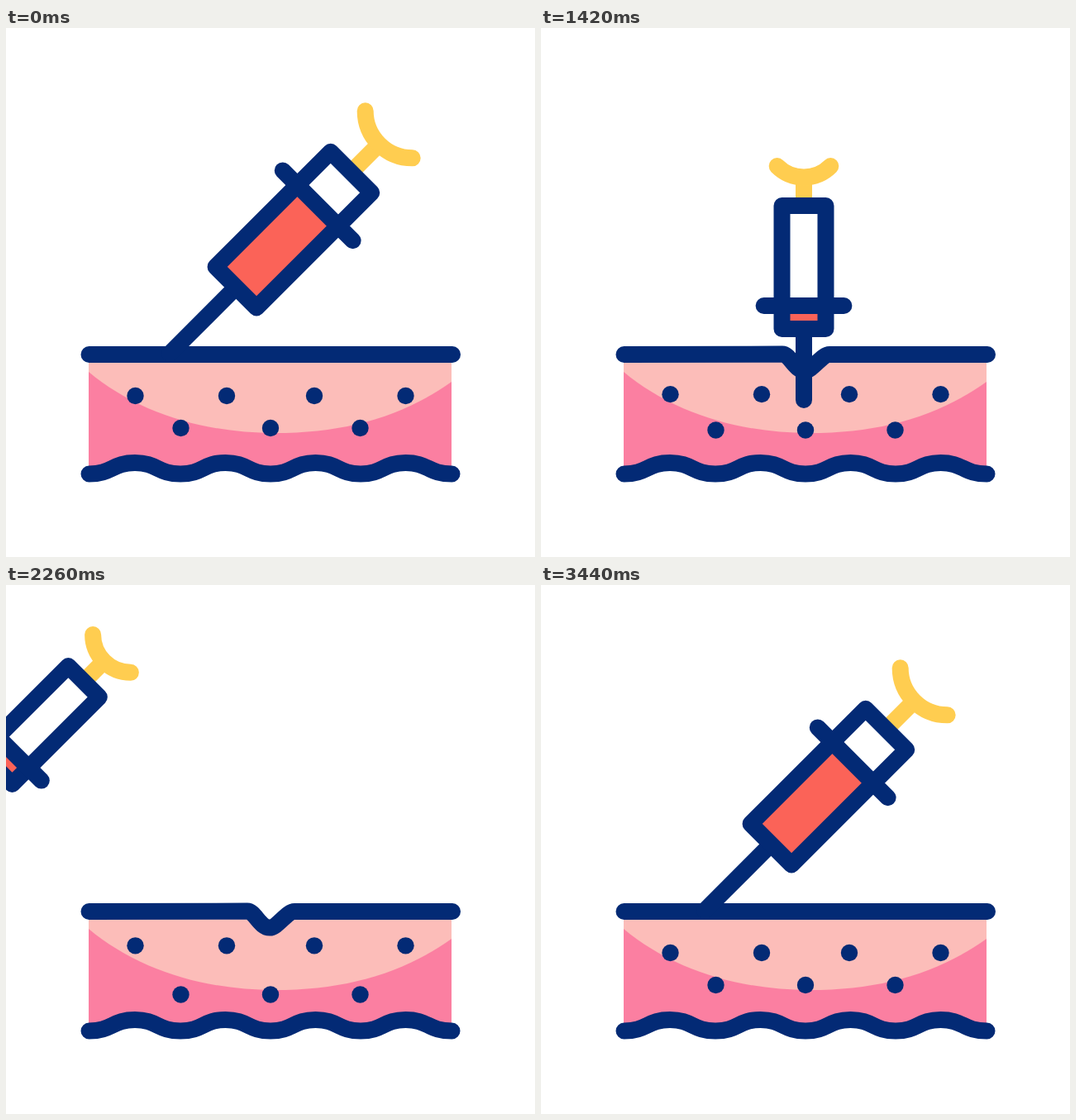
Write an HTML page that moves like this. It is 640 px wide and 640 px high and loops after 3.6 s.

```html
<!DOCTYPE html>
<html lang="en">
<head>
<meta charset="utf-8">
<title>Injection</title>
<style>
  html, body { margin: 0; width: 100%; height: 100%; overflow: hidden; background: #fff; }
  svg { display: block; width: 640px; height: 640px; }

  .line { fill: none; stroke: #032a75; stroke-width: 20; stroke-linecap: round; stroke-linejoin: round; }
  .thin * { vector-effect: non-scaling-stroke; }
  .white { fill: #fff; }
  .yellow { stroke: #ffcd50; }
  .butt { stroke-linecap: butt; }
  .dots { fill: #032a75; }

  .syringe, .grip, .bar, .fluid, .dots, .surface {
    animation: 3600ms cubic-bezier(.37, 0, .63, 1) infinite;
  }
  .syringe { animation-name: travel, tilt, size; }
  .grip { animation-name: grip; }
  .bar { animation-name: bar; }
  .fluid { animation-name: drain; }
  .surface { animation-name: dent; }
  .dots { animation-name: drift; }
  .upper { --shift: -9px; }
  .lower { --shift: 12px; }

  /* Position of the needle tip */
  @keyframes travel {
    0%, 6.667% { translate: 198px 394px; }
    17.778% { translate: 318px 336px; }
    27.778%, 40% { translate: 318px 450px; }
    50% { translate: 318px 337px; animation-timing-function: cubic-bezier(.33, 0, .67, .33); }
    55% { translate: 221px 330px; animation-timing-function: linear; }
    62.778% { translate: -71px 283px; animation-timing-function: linear; }
    67.222% { translate: -240px 282px; }
    67.23%, 76.667% { translate: 711px 366px; }
    95.556%, 100% { translate: 198px 394px; }
  }
  @keyframes tilt {
    0%, 6.667% { rotate: 45deg; }
    17.778%, 49.6% { rotate: 0deg; }
    62.778%, 100% { rotate: 45deg; }
  }
  @keyframes size {
    0%, 6.667% { scale: 1; }
    17.778%, 67.222% { scale: .757; }
    67.23%, 100% { scale: 1; }
  }

  /* Plunger handle, stopper and fluid */
  @keyframes grip {
    0%, 6.667% { translate: 0 0; scale: 1; }
    17.778%, 27.778% { translate: 0 -31.7px; scale: .985; }
    38.333%, 67.222% { translate: 0 1.3px; scale: 1.06; }
    67.23%, 100% { translate: 0 0; scale: 1; }
  }
  @keyframes bar {
    0%, 6.667% { translate: 0 0; scale: 1; }
    17.778%, 27.778% { translate: 0 0; scale: .99; }
    38.333%, 67.222% { translate: 0 102.8px; scale: 1.065; }
    67.23%, 100% { translate: 0 0; scale: 1; }
  }
  @keyframes drain {
    0%, 27.778% { scale: 1 1; }
    38.333%, 67.222% { scale: 1 .265; }
    67.23%, 100% { scale: 1 1; }
  }

  /* Skin */
  @keyframes dent {
    0%, 21.111%, 77.778%, 100% {
      d: path("M100.5 395L310 395C314 395 316 395 319 395C322 395 325 395 328 395L540 395");
    }
    26.111%, 68.333% {
      d: path("M100.5 395L292 394.6C301 394.6 307 414.6 319 414.6C328 414.6 340 395 349 395L540 395");
    }
  }
  @keyframes drift {
    0%, 17.222% { translate: 0 0; }
    30.556% { translate: 0 var(--shift); }
    43.333% { translate: 0 0; }
    65.556% { translate: 0 var(--shift); }
    81.667%, 100% { translate: 0 0; }
  }
</style>
</head>
<body>
<svg viewBox="0 0 640 640">
  <rect x="100" y="395" width="439" height="137" fill="#fb7fa1"/>
  <path d="M100 395V416C160 466 240 490 325 490C410 490 480 470 539 428V395Z" fill="#fcbdb9"/>
  <path class="line" d="M100.5 539.5c28 0 28-13.5 55.5-13.5s27 13.5 55 13.5 27-13.5 54.5-13.5 27 13.5 54.5 13.5 27-13.5 54.5-13.5 27 13.5 54.5 13.5 27-13.5 54.5-13.5 27 13.5 56 13.5"/>

  <g class="dots upper">
    <circle cx="156.5" cy="445" r="10.2"/>
    <circle cx="267" cy="445" r="10.2"/>
    <circle cx="373" cy="445" r="10.2"/>
    <circle cx="483.5" cy="445" r="10.2"/>
  </g>
  <g class="dots lower">
    <circle cx="211.5" cy="484" r="10.2"/>
    <circle cx="320" cy="484" r="10.2"/>
    <circle cx="428.5" cy="484" r="10.2"/>
  </g>

  <path class="line white surface" d="M100.5 395L310 395C314 395 316 395 319 395C322 395 325 395 328 395L540 395"/>

  <!-- The needle tip is the origin -->
  <g class="syringe thin">
    <g transform="translate(0 -375)">
      <g class="grip">
        <path class="line yellow butt" d="M0 16.7V110"/>
        <path class="line yellow" d="M-40.3 0A57 57 0 0 0 40.3 0"/>
      </g>
    </g>
    <path class="line" d="M0 0V-113.6"/>
    <rect class="white" x="-35" y="-310.4" width="70" height="196.8"/>
    <g transform="translate(0 -113.6)">
      <rect class="fluid" x="-35" y="-139.8" width="70" height="139.8" fill="#fb6358"/>
    </g>
    <rect class="line" x="-35" y="-310.4" width="70" height="196.8"/>
    <g transform="translate(0 -253.4)">
      <path class="line bar" d="M-60 0H60"/>
    </g>
  </g>
</svg>
</body>
</html>
```
